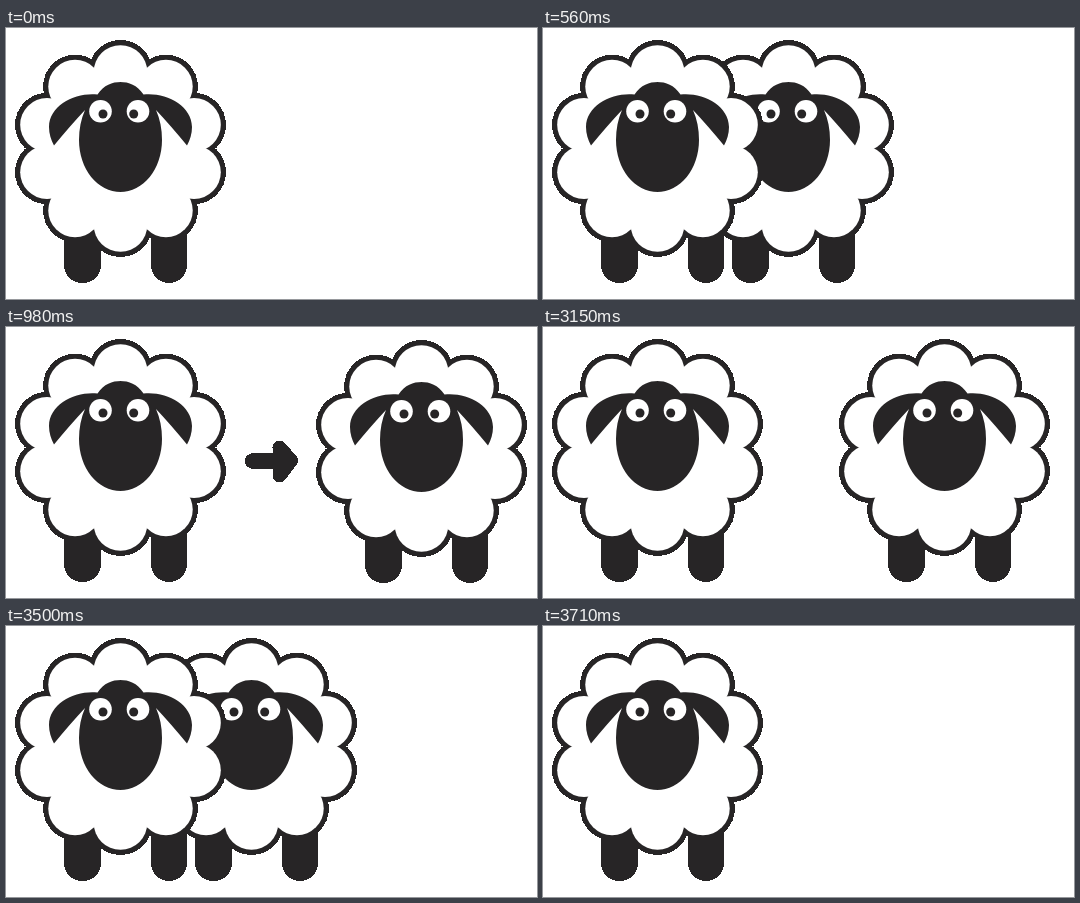
An HTML page for the animation above (4.06 s loop, 531 px wide and 271 px high).

```html
<!DOCTYPE html>
<html lang="en">
<head>
<meta charset="utf-8">
<title>Two sheep</title>
<style>
  html, body { margin: 0; width: 100%; height: 100%; overflow: hidden; background: #fff; }
  svg { display: block; width: 100%; height: 100%; }
  .ink { fill: #272526; }
  .wool { fill: #fff; }
  .crisp { shape-rendering: crispEdges; }
  #arrow { stroke: #272526; stroke-width: 14; stroke-linecap: round; stroke-linejoin: round; }
</style>
</head>
<body>
<svg viewBox="0 0 531 271">
  <defs>
    <g id="sheep">
      <g class="ink crisp">
        <rect x="58" y="180" width="37" height="75" rx="18"/>
        <rect x="145" y="180" width="36" height="75" rx="18"/>
        <g id="outline"></g>
      </g>
      <g id="fleece" class="wool">
        <circle cx="114.5" cy="120.5" r="78"/>
      </g>
      <g class="ink">
        <path id="half" d="M115 54C106 54 98 57 91.500 66.500C70 64 43 77 43 99C43 106 45 112 48 117.500Q64 98 79 82C75 91 73 101 73 112C73 141 91.600 164 115 164Z"/>
        <use href="#half" transform="matrix(-1 0 0 1 229 0)"/>
      </g>
      <g class="wool">
        <circle cx="94.5" cy="83.300" r="11.300"/>
        <circle cx="132" cy="83.300" r="11.300"/>
      </g>
      <g class="ink">
        <circle cx="97" cy="86" r="4.500"/>
        <circle cx="127.700" cy="86" r="4.500"/>
      </g>
    </g>
  </defs>
  <use id="twin" href="#sheep"/>
  <use href="#sheep"/>
  <g id="arrow" class="ink crisp">
    <path d="M246.500 134H272" stroke-width="15.500"/>
    <path d="M273.500 120.500L285 133.500L273.500 148.500Z"/>
  </g>
</svg>
<script>
  const LOOP = 4060;
  const SVG_NS = 'http://www.w3.org/2000/svg';

  // Ten round lobes form the fleece.
  function addLobes(id, radius) {
    const group = document.getElementById(id);
    for (let i = 0; i < 10; i++) {
      const angle = (i * 36 - 90) * Math.PI / 180;
      const lobe = document.createElementNS(SVG_NS, 'circle');
      lobe.setAttribute('cx', 114.5 + 77.3 * Math.cos(angle));
      lobe.setAttribute('cy', 120.5 + 76.5 * Math.sin(angle));
      lobe.setAttribute('r', radius);
      group.append(lobe);
    }
  }
  addLobes('outline', 32);
  addLobes('fleece', 26.8);

  // Each row: [start in ms, value], held until the next row.
  function play(id, rows, toStyle) {
    const frames = rows.map(([time, ...value]) =>
      ({ offset: time / LOOP, easing: 'step-end', ...toStyle(...value) }));
    frames.push({ ...frames[0], offset: 1 });
    document.getElementById(id).animate(frames, { duration: LOOP, iterations: Infinity });
  }

  play('twin', [
    [0, 0, 0], [420, 72, 0], [490, 112, 0], [560, 131, 0], [630, 150, 1],
    [770, 168, 1], [910, 287, 0], [980, 301, 1],
    [3150, 287, 0], [3220, 168, 1], [3360, 150, 1],
    [3500, 131, 0], [3570, 112, 0], [3640, 72, 0], [3710, 0, 0]
  ], (x, y) => ({ transform: `translate(${x}px, ${y}px)` }));

  play('arrow', [[0, 0], [980, 1], [3150, 0]], opacity => ({ opacity }));
</script>
</body>
</html>
```
